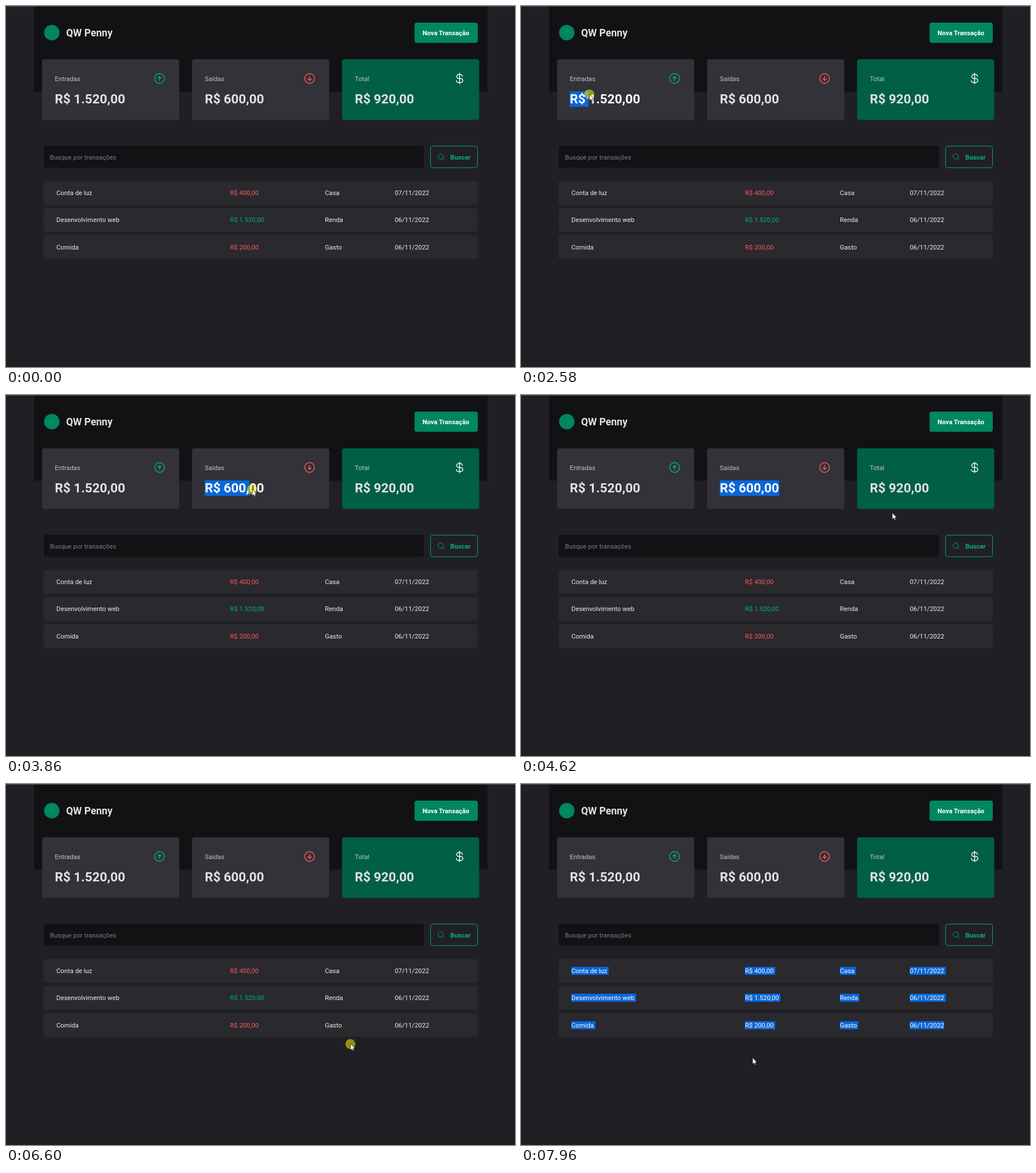
Animation, 889 px wide and 630 px high, one loop 8000 ms. Source, as an HTML page:

```html
<!DOCTYPE html>
<html lang="pt-BR">
<head>
<meta charset="utf-8">
<title>Transações</title>
<style>
  html, body { margin: 0; width: 100%; height: 100%; overflow: hidden; background: #202024; }
  svg { display: block; font: 11.3px Roboto, sans-serif; }
  .bold { font-weight: 700; }
  .value { font: 700 22.6px Roboto, sans-serif; }
  .icon { fill: none; stroke-width: 16; stroke-linecap: round; stroke-linejoin: round; }
</style>
</head>
<body>
<svg id="stage" width="889" height="630" viewBox="0 0 889 630">
  <rect width="889" height="630" fill="#202024"/>
  <rect x="49" width="792" height="149.5" fill="#121214"/>
  <rect width="889" height="1" fill="#57585c"/>
  <circle cx="80" cy="46.5" r="13.5" fill="#00875f"/>
  <text x="105" y="53" fill="#e1e1e6" class="bold" style="font-size:17.6px">QW Penny</text>
  <rect x="713.5" y="29" width="110.5" height="35.3" rx="4" fill="#00875f"/>
  <text x="727.5" y="51" fill="#fff" class="bold">Nova Transação</text>
  <rect x="66" y="244" width="664" height="38.5" rx="4" fill="#121214"/>
  <text x="76.8" y="268" fill="#7c7c8a">Busque por transações</text>
  <rect x="741.5" y="244.5" width="82" height="37.7" rx="4" fill="none" stroke="#02a473"/>
  <text x="776" y="268" fill="#00b37e" class="bold">Buscar</text>
</svg>
<script>
const stage = document.getElementById('stage');
const LOOP = 8000, STEP = 69, GREEN = '#00b37e', RED = '#fa5a5c';

function add(tag, attrs, text = '') {
  const el = document.createElementNS('http://www.w3.org/2000/svg', tag);
  for (const name in attrs) el.setAttribute(name, attrs[name]);
  el.textContent = text;
  return stage.appendChild(el);
}

function icon(x, y, size, stroke, d) {
  add('path', { class: 'icon', stroke, d,
    transform: `translate(${x} ${y}) scale(${size / 256}) translate(-128 -128)` });
}

// A text with a highlight behind it that can cover any run of characters.
function selectable(x, y, text, fill, cls, top, height) {
  const mark = add('rect', { y: top, height, fill: '#0a66d9' });
  const el = add('text', { x, y, fill, class: cls }, text);
  const edges = [...text].map((_, i) => el.getStartPositionOfChar(i).x);
  const end = x + el.getComputedTextLength();
  edges.push(end);
  return {
    start: x,
    end,
    caret: px => edges.reduce((a, b) => Math.abs(b - px) < Math.abs(a - px) ? b : a),
    select(from, to) {
      mark.setAttribute('x', Math.round(from));
      mark.setAttribute('width', Math.round(to) - Math.round(from));
      el.setAttribute('fill', to > from ? '#fff' : fill);
    }
  };
}

const ring = 'M224 128a96 96 0 1 1-192 0a96 96 0 1 1 192 0M128 88V168';
const dollar = 'M128 24V232M184 88a40 40 0 0 0-40-40H112a40 40 0 0 0 0 80h40' +
  'a40 40 0 0 1 0 80H104a40 40 0 0 1-40-40';

const values = [
  ['Entradas', 'R$ 1.520,00', '#323238', GREEN, ring + 'M94 122L128 88L162 122'],
  ['Saídas', 'R$ 600,00', '#323238', RED, ring + 'M94 134L128 168L162 134'],
  ['Total', 'R$ 920,00', '#015f43', '#fff', dollar]
].map(([label, value, fill, color, d], i) => {
  const x = 63 + 262 * i, textX = x + 22.3;
  add('rect', { x, y: 93, width: 239.5, height: 105.7, rx: 4, fill });
  add('text', { x: textX, y: 131, fill: '#c4c4cc' }, label);
  icon(x + 205.2, 126.5, 22.6, color, d);
  return selectable(textX, 170, value, '#e1e1e6', 'value', 149, 27);
});

icon(760, 263.4, 14.1, GREEN, 'M200 116a84 84 0 1 1-168 0a84 84 0 1 1 168 0M175.4 175.4L224 224');

const ROW_HEIGHT = 41.5, columns = [88, 391.3, 557, 679];
const rows = [
  ['Conta de luz', 'R$ 400,00', 'Casa', '07/11/2022'],
  ['Desenvolvimento web', 'R$ 1.520,00', 'Renda', '06/11/2022'],
  ['Comida', 'R$ 200,00', 'Gasto', '06/11/2022']
].map((texts, r) => {
  const top = 305.3 + 47.4 * r, baseline = Math.round(top + 24.7);
  add('rect', { x: 65.5, y: top, width: 758.5, height: ROW_HEIGHT, rx: 4, fill: '#29292e' });
  const cells = texts.map((text, c) => {
    const fill = c !== 1 ? '#eeeef1' : texts[2] === 'Renda' ? GREEN : RED;
    return selectable(columns[c], baseline, text, fill, '', baseline - 11, 14);
  });
  return { top, cells };
});

const halo = add('circle', { r: 8.7, cy: 1, fill: '#fff700', 'fill-opacity': .52 });
const arrow = add('path', { d: 'M.4 .5V12L3 9.6L4.8 13.3L6.5 12.6L4.9 8.9H8.3Z',
  fill: '#fff', stroke: '#111', 'stroke-width': .7 });

// Pointer stops: time, x, y and, while the button is down, what is being selected
// (0 to 2: a value, 3: the table).
const TABLE = 3;
const stops = [
  [0, 837, 650], [130, 837, 618], [860, 568, 460], [1320, 568, 460], [1810, 184, 239],
  [2210, 84, 152, 0], [3190, 265, 157],
  [3490, 346, 158, 1], [4220, 488, 171, 1], [4410, 488, 171], [4620, 648, 205], [4760, 732, 180],
  [5350, 603, 154, 2], [5760, 769, 163], [6110, 755, 437],
  [6390, 788, 478, TABLE], [7020, 65.5, 351, TABLE], [7200, 64, 326],
  [7770, 354, 494], [7960, 404, 477], [LOOP, 404, 477]
];

const lastStop = test => stops.length - 1 - [...stops].reverse().findIndex(test);

function slope(i, axis) {
  const [a, b] = [stops[i], stops[i + 1]];
  return a && b ? (b[axis] - a[axis]) / (b[0] - a[0]) : 0;
}

// Monotone tangent: smooth through a stop, zero at a turn or a pause.
function tangent(i, axis) {
  const before = slope(i - 1, axis), after = slope(i, axis);
  return before * after > 0 ? 2 * before * after / (before + after) : 0;
}

function pointer(t) {
  const i = lastStop(s => s[0] <= t), a = stops[i], b = stops[i + 1];
  const span = b[0] - a[0], steps = Math.max(1, Math.round(span / STEP));
  const u = Math.floor((t - a[0]) / span * steps) / steps, v = 1 - u;
  return [1, 2].map(axis =>
    a[axis] * v * v * (1 + 2 * u) + b[axis] * u * u * (1 + 2 * v) +
    span * u * v * (tangent(i, axis) * v - tangent(i + 1, axis) * u));
}

function draw(t) {
  const [x, y] = pointer(t);
  const pressed = stops[lastStop(s => s[0] <= t)][3] !== undefined;
  for (const el of [halo, arrow]) el.setAttribute('transform', `translate(${x} ${y})`);
  halo.setAttribute('visibility', pressed ? 'visible' : 'hidden');

  // A selection follows the pointer until release and stays until the next press.
  const held = lastStop(s => s[0] <= t && s[3] !== undefined);
  const dragged = held < stops.length ? stops[held][3] : undefined;
  const [px, py] = dragged === undefined ? [0, 0] : pointer(Math.min(t, stops[held + 1][0]));

  values.forEach((v, i) => v.select(v.start, i === dragged ? v.caret(px) : v.start));
  rows.forEach(({ top, cells }, r) => cells.forEach((cell, c) => {
    const reached = dragged === TABLE && py < top + ROW_HEIGHT;
    const from = !reached ? cell.end : py < top ? cell.start : cell.caret(px);
    const isLast = r === rows.length - 1 && c === cells.length - 1;
    cell.select(from, from < cell.end && !isLast ? cell.end + 2.6 : cell.end);
  }));
}

function tick() {
  draw(performance.now() % LOOP);
  requestAnimationFrame(tick);
}
tick();
</script>
</body>
</html>
```
